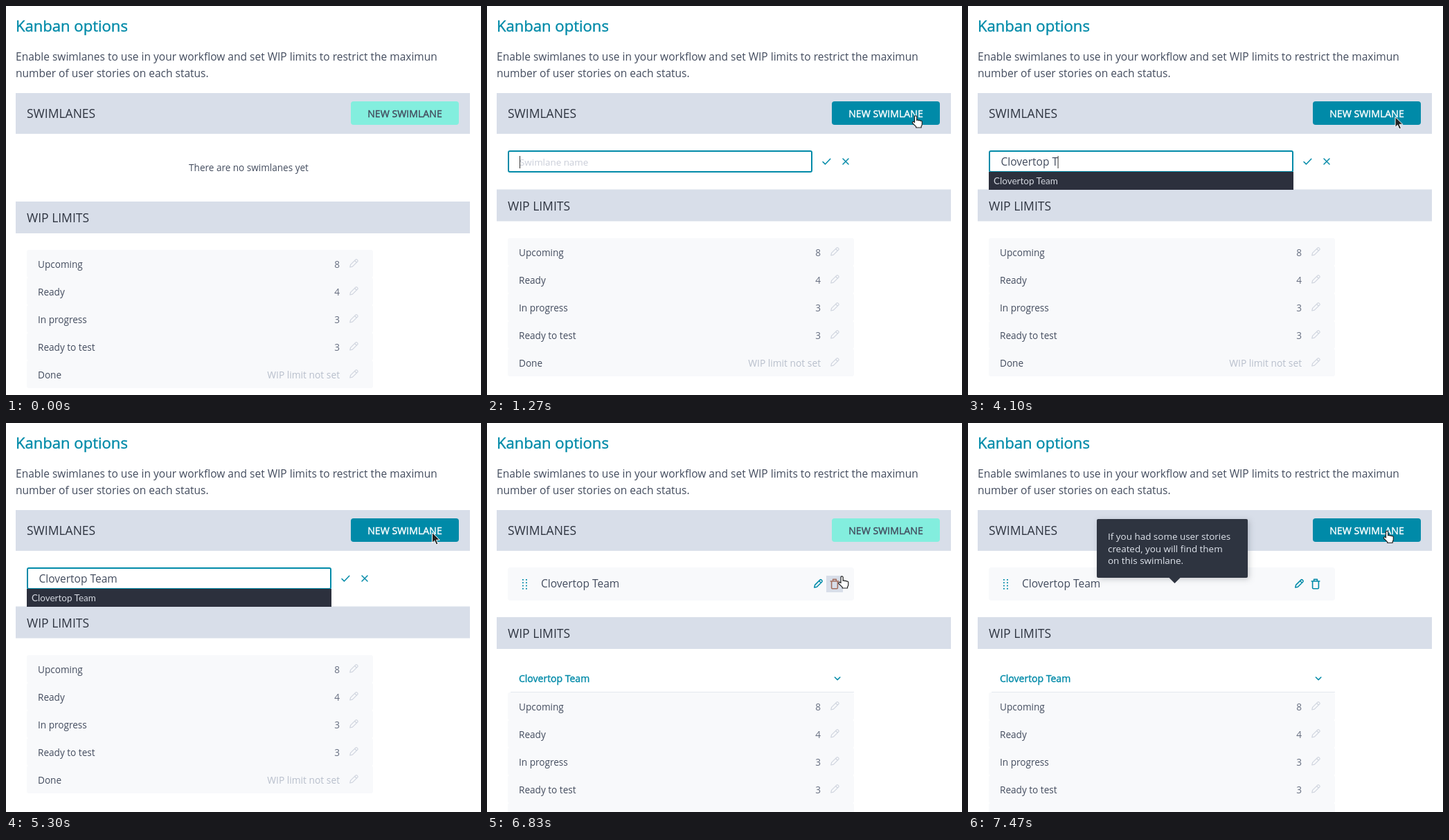
An HTML page for the animation above (8 s loop, 686 px wide and 563 px high).

```html
<!DOCTYPE html>
<html lang="en">
<head>
<meta charset="utf-8">
<title>Kanban options</title>
<style>
html, body { margin: 0; width: 100%; height: 100%; overflow: hidden; background: #fff; }
svg { display: block; width: 686px; height: 563px; }
text { font-family: "Open Sans", "Noto Sans", sans-serif; fill: #434c5e; white-space: pre; }
.medium { stroke-width: .4; paint-order: stroke; }
.line { fill: none; stroke-linecap: round; stroke-linejoin: round; }
#tip rect { filter: drop-shadow(2px 2px 4px rgba(46, 52, 64, .25)); }
</style>
</head>
<body>
<svg id="stage" viewBox="0 0 686 563" xmlns="http://www.w3.org/2000/svg"></svg>
<script>
const LOOP = 8000;
const TEAL = '#008aa8', GREEN = '#83eede', INK = '#2e3440', TEXT = '#434c5e', BAR = '#d8dee9', ROW = '#f8f9fb';
const NAME = 'Clovertop Team';
const KEYS = [2230, 2470, 2580, 2700, 2870, 3030, 3200, 3360, 3530, 3700, 4100, 4270, 4470, 4550];

// Markup helpers
const text = (x, y, size, str, extra = '') =>
  `<text x="${x}" y="${y}" font-size="${size}" ${extra}>${str}</text>`;
const rect = (x, y, w, h, fill, extra = '') =>
  `<rect x="${x}" y="${y}" width="${w}" height="${h}" fill="${fill}" ${extra}/>`;
const line = (d, color, width, extra = '') =>
  `<path class="line" d="${d}" stroke="${color}" stroke-width="${width}" ${extra}/>`;
const group = (id, body) => `<g id="${id}">${body}</g>`;
const medium = color => `class="medium" style="fill:${color};stroke:${color}"`;
const pencil = (x, y, color, width) =>
  line('M.8 12l.8-3.6 7.3-7.3a1.5 1.5 0 0 1 2.1 0l.7.7a1.5 1.5 0 0 1 0 2.1l-7.3 7.3zM7.6 2.5l2.7 2.7',
    color, width, `transform="translate(${x} ${y})"`);

const rows = [['Upcoming', 8], ['Ready', 4], ['In progress', 3], ['Ready to test', 3], ['Done', null]];
const listRow = ([label, limit], i) => {
  const y = i * 40;
  const value = limit === null
    ? text(482, y + 26, 13.8, 'WIP limit not set', 'text-anchor="end" style="fill:#b8bfcc"')
    : text(482, y + 26, 13.6, limit, 'text-anchor="end" style="fill:#666e80"');
  return rect(30, y, 500, 40, ROW, 'rx="3"') + text(46, y + 26, 13.6, label) + value +
    pencil(496, y + 13, '#d0d5df', 1.2);
};

let dots = '';
for (let i = 0; i < 8; i++)
  dots += rect(51 + (i % 2) * 5, 226 + (i >> 1) * 4.3, 1.8, 1.8, TEAL);

const stage = document.getElementById('stage');
stage.innerHTML =
  text(14, 37, 22.06, 'Kanban options', medium(TEAL)) +
  text(14, 79, 15.53, 'Enable swimlanes to use in your workflow and set WIP limits to restrict the maximun') +
  text(14, 103, 15.53, 'number of user stories on each status.') +
  rect(14, 126, 656, 59, BAR) +
  text(30, 162, 17.5, 'SWIMLANES', `style="fill:${INK}"`) +
  rect(498, 138, 156, 34, GREEN, 'rx="4" id="button"') +
  text(576, 161, 14.15, 'NEW SWIMLANE', 'id="label" class="medium" text-anchor="middle"') +

  group('empty', text(350.5, 239, 13.55, 'There are no swimlanes yet', 'text-anchor="middle"')) +

  group('wip', rect(14, 0, 656, 46, BAR) + text(30, 30, 17.5, 'WIP LIMITS', `style="fill:${INK}"`)) +
  group('list', rows.map(listRow).join('')) +

  group('form',
    rect(31, 210, 438, 30, '#fff', 'rx="2" stroke-width="2" id="field"') +
    text(47, 230.5, 13.4, 'Swimlane name', 'id="hint" style="fill:#c9cdd8"') +
    text(47.5, 231, 15.53, '', 'id="typed"') +
    rect(47, 217, 1, 18, '#333', 'id="caret"') +
    rect(478, 213, 25, 25, BAR, 'id="checkBg"') +
    rect(477.5, 212.5, 25, 25, 'none', 'id="checkFocus" stroke="#4c566a" stroke-dasharray="1 1"') +
    line('M485 225.5l3.4 3.4 7.4-7.6', TEAL, 1.5) +
    line('M514 221l8 8m0-8l-8 8', TEAL, 1.5) +
    group('suggest', rect(30, 240, 440, 26, '#2c303d') +
      text(37, 258, 13.5, NAME, 'style="font-family:Lato,sans-serif;fill:#d3d7df"'))) +

  group('lane',
    rect(30, 209, 500, 48, ROW, 'rx="4"') + dots +
    text(78, 238, 15.53, NAME) +
    rect(466, 221, 24, 24, BAR, 'id="editBg"') +
    rect(490, 221, 24, 24, BAR, 'id="trashBg"') +
    pencil(472, 226, TEAL, 1.5) +
    line('M496.2 229h11.6M499.6 228.6v-2.2h4.8v2.2M497.6 229.2v9.3q0 1.2 1.2 1.2h6.4q1.2 0 1.2-1.2v-9.3',
      TEAL, 1.6, 'id="trash"') +
    text(46, 375, 14, NAME, medium(TEAL)) +
    line('M502.4 368l3.7 3.7 3.7-3.7', TEAL, 1.6) +
    rect(34, 389, 496, 1, '#e3e8ef')) +

  group('tip',
    rect(186, 139, 218, 85, INK, 'rx="2"') +
    `<path d="M290 223.5h17l-8.5 8.5z" fill="${INK}"/>` +
    ['If you had some user stories', 'created, you will find them', 'on this swimlane.']
      .map((s, i) => text(202, 169 + i * 17.7, 13.45, s, 'style="fill:#dfe4ec"')).join('')) +

  group('cursor',
    '<path id="arrow" d="M0 0v15l3.4-3.2 2.5 5.8 2.6-1.1-2.5-5.7h4.8z" fill="#222" stroke="#fff" stroke-linejoin="round"/>' +
    '<path id="hand" transform="translate(-4 -1)" fill="#fff" stroke="#222" stroke-width="1.2" stroke-linejoin="round" ' +
    'd="M4 2a1.6 1.6 0 0 1 3.2 0v5a1.5 1.5 0 0 1 2.7.4a1.5 1.5 0 0 1 2.6.5a1.4 1.4 0 0 1 2.3 1v3.6' +
    'q0 2-1.2 3.2v1.8H6.2v-1.3L1 11a1.5 1.5 0 0 1 2.2-1.9l.8.9z"/>');

const el = {};
stage.querySelectorAll('[id]').forEach(node => el[node.id] = node);

// Timing helpers
const clamp = v => Math.max(0, Math.min(1, v));
const smooth = v => v * v * (3 - 2 * v);
const fade = (t, start, length) => smooth(clamp((t - start) / length));
const within = (t, a, b) => t >= a && t < b;
const show = (node, on) => node.setAttribute('display', on ? 'inline' : 'none');
const opacity = (node, v) => node.setAttribute('opacity', v);
const move = (node, x, y) => node.setAttribute('transform', `translate(${x} ${y})`);
const mix = (a, b, k) => {
  const part = (c, i) => parseInt(c.slice(i, i + 2), 16);
  return `rgb(${[1, 3, 5].map(i => Math.round(part(a, i) + (part(b, i) - part(a, i)) * k))})`;
};

// Pointer moves: start, end, from x, y, to x, y
const moves = [
  [200, 630, 668, 178, 617.5, 159.5],
  [2230, 2330, 617.5, 159.5, 617, 160.5],
  [5300, 5530, 615.5, 158.5, 688, 164],
  [5730, 6050, 546, 205, 486, 221.5],
  [6600, 6830, 486, 221.5, 511, 222.5],
  [6940, 7430, 511, 222.5, 603.5, 157]
];

function pointer(t) {
  let now = moves[0];
  for (const m of moves) if (t >= m[0]) now = m;
  const [a, b, x0, y0, x1, y1] = now;
  const k = fade(t, a, b - a);
  return [x0 + (x1 - x0) * k, y0 + (y1 - y0) * k];
}

function draw(t) {
  const formOn = within(t, 970, 6300);
  const laneOn = t >= 6470;

  // Layout
  show(el.form, formOn);
  show(el.empty, !formOn && !laneOn);
  show(el.lane, laneOn);
  move(el.wip, 0, formOn ? 265.5 : laneOn ? 281 : 283);
  move(el.list, 0, formOn ? 336 : laneOn ? 390 : 353);

  // Button
  const hot = fade(t, 370, 220) - fade(t, 5360, 170) + fade(t, 7220, 220);
  el.button.setAttribute('fill', mix(GREEN, TEAL, hot));
  const ink = mix(TEXT, '#ffffff', hot);
  el.label.style.fill = el.label.style.stroke = ink;

  // Form
  const typed = NAME.slice(0, KEYS.filter(k => t >= k).length);
  if (el.typed.textContent !== typed) el.typed.textContent = typed;
  const typedWidth = formOn && typed ? el.typed.getComputedTextLength() : 0;
  el.caret.setAttribute('x', 47 + typedWidth);
  show(el.caret, t < 4630);
  show(el.hint, !typed);
  show(el.suggest, within(t, 2300, 5960));
  const focus = fade(t, 970, 290) - fade(t, 5960, 130);
  el.field.setAttribute('stroke', mix('#d8dae6', TEAL, focus));
  opacity(el.checkBg, fade(t, 5900, 120));
  show(el.checkFocus, t >= 5960);

  // Swimlane row
  opacity(el.editBg, 1 - fade(t, 6640, 150));
  const over = fade(t, 6660, 150) - fade(t, 6990, 150);
  opacity(el.trashBg, over);
  el.trash.setAttribute('stroke', mix(TEAL, '#a36f60', over));
  opacity(el.tip, fade(t, 7000, 220));

  // Pointer
  const [x, y] = pointer(t);
  const hand = within(t, 370, 2230) || within(t, 5890, 6300) || within(t, 6470, 7040) || t >= 7220;
  show(el.cursor, within(t, 200, 5530) || t >= 5730);
  move(el.cursor, x.toFixed(2), y.toFixed(2));
  show(el.hand, hand);
  show(el.arrow, !hand);
}

const begin = performance.now();
function tick() {
  draw((performance.now() - begin) % LOOP);
  requestAnimationFrame(tick);
}
tick();
</script>
</body>
</html>
```
